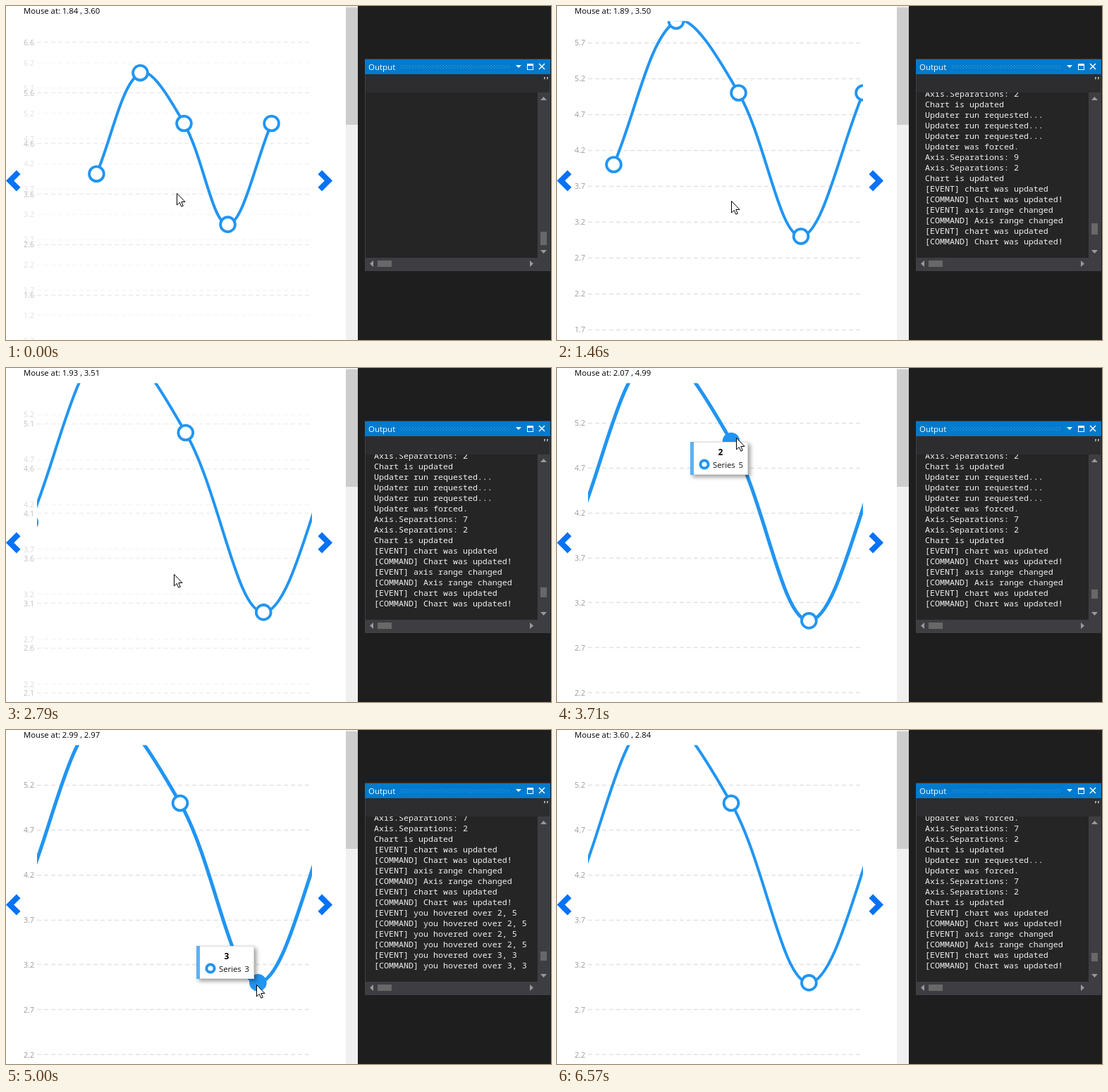
Write an HTML page with a canvas that moves like this. It is 773 px wide and 475 px high and loops after 6.63 s.

```html
<!DOCTYPE html>
<html lang="en">
<head>
<meta charset="utf-8">
<title>Zoom and pan chart</title>
<style>
html, body { margin: 0; width: 100%; height: 100%; overflow: hidden; background: #1e1e1e; }
canvas { display: block; }
</style>
</head>
<body>
<canvas id="stage" width="773" height="475"></canvas>
<script>
const g = document.getElementById('stage').getContext('2d');
const LOOP = 6630, BLUE = '#2195f2';
const SANS = '"Open Sans", sans-serif', MONO = '"Noto Sans Mono", monospace';
const VALUES = [4, 6, 5, 3, 5];

// Axis views: pixel place of index 2 / value 5, pixels per unit, top label, label step
const view = (start, x, dx, y, dy, top, step) => ({ start, x, dx, y, dy, top, step });
const VIEWS = [
  view(-999, 251.4, 57.84, 173.9, 67, 6.6, 1),
  view(-90, 255, 71.7, 151, 83, 6.2, .5),
  view(570, 257.5, 88.5, 123.5, 102, 5.7, .5),
  view(1690, 259.6, 110.5, 84.5, 127.7, 5.1, .5),
  view(2676, 247, 110.4, 104, 127.7, 5.2, .5)
];
const ANIM = 300;

// time, x, y of the pointer tip
const MOUSE = [
  [0, 243.2, 267.2], [20, 243.2, 267.2], [290, 243.4, 271.3], [1000, 243.4, 271.3],
  [1140, 247.9, 273.5], [1320, 247.9, 273.5], [1460, 247.9, 277.6], [2270, 247.9, 277.6],
  [2670, 239.4, 294.3], [3340, 239.4, 294.3], [3680, 254.7, 105.3], [3710, 254.7, 100.5],
  [3980, 254, 98], [4100, 254, 98], [4650, 352, 399], [4800, 357, 369], [4960, 356.2, 362.8],
  [5640, 356.2, 362.8], [5900, 433, 382.4], [6300, 600, 440], [6560, 720, 480]
];
const LEAVE = 5900, HOVER = { from: 3660, next: 4180, third: 4790, to: 5360 };

// Console text
const seps = (a, b) => ['Axis.Separations: ' + a, 'Axis.Separations: ' + b, 'Chart is updated'];
const note = (event, command) => ['[EVENT] ' + event, '[COMMAND] ' + command];
const drawn = note('chart was updated', 'Chart was updated!');
const tail = [...drawn, ...note('axis range changed', 'Axis range changed'), ...drawn];
const run = 'Updater run requested...', forced = 'Updater was forced.';
const update = (prev, a, b) =>
  [...seps(a, prev), run, run, run, forced, ...seps(a, b), ...tail].slice(-15);
const over = (i, v) => note(`you hovered over ${i}, ${v}`, `you hovered over ${i}, ${v}`);
const zoomed = update(2, 7, 2);
const twice = [...zoomed, ...over(2, 5), ...over(2, 5)];
// time, lines, scroll thumb top and height
const LOG = [
  [0, [], 321, 19],
  [110, update(3, 11, 3), 306, 17],
  [775, update(2, 9, 2), 309, 16],
  [1890, zoomed, 312, 14],
  [2940, zoomed, 315, 13],
  [4130, twice, 315, 13],
  [4800, [...twice, ...over(3, 3)], 315, 13],
  [6100, [forced, ...seps(7, 2), run, forced, ...seps(7, 2), ...tail], 317, 12]
];

const clamp = v => Math.max(0, Math.min(1, v));
const mix = (a, b, p) => a + (b - a) * p;
const latest = (list, t, key) => list.filter(e => e[key] <= t).pop();

function mouseAt(t) {
  const n = MOUSE.findIndex(k => k[0] > t);
  if (n < 0) return MOUSE[MOUSE.length - 1].slice(1);
  if (n === 0) return MOUSE[0].slice(1);
  const a = MOUSE[n - 1], b = MOUSE[n], p = (t - a[0]) / (b[0] - a[0]);
  return [mix(a[1], b[1], p), mix(a[2], b[2], p)];
}

function rect(color, x, y, w, h) {
  g.fillStyle = color;
  g.fillRect(x, y, w, h);
}
function text(s, x, y, font, color, align = 'left') {
  g.font = font;
  g.fillStyle = color;
  g.textAlign = align;
  g.fillText(s, x, y);
}
function poly(points, color) {
  g.beginPath();
  points.forEach(([x, y]) => g.lineTo(x, y));
  g.closePath();
  g.fillStyle = color;
  g.fill();
}
function stroke(points, color, width) {
  g.beginPath();
  points.forEach(([x, y]) => g.lineTo(x, y));
  g.strokeStyle = color;
  g.lineWidth = width;
  g.stroke();
}
function ring(x, y, r, width, fill) {
  g.beginPath();
  g.arc(x, y, r, 0, Math.PI * 2);
  g.fillStyle = fill;
  g.fill();
  g.strokeStyle = BLUE;
  g.lineWidth = width;
  g.stroke();
}

function labels(v) {
  const out = [];
  for (let n = v.top; n > 0; n -= v.step) out.push(n.toFixed(1));
  return out;
}

function grid(from, to, p, yOf) {
  const a = labels(from), b = labels(to);
  for (const s of new Set([...a, ...b])) {
    const y = yOf(+s);
    g.globalAlpha = (a.includes(s) ? 1 - p : 0) + (b.includes(s) ? p : 0);
    g.setLineDash([6, 4]);
    stroke([[44, Math.floor(y) + .5], [434, Math.floor(y) + .5]], '#e2e2e2', 1.4);
    g.setLineDash([]);
    text(s, 25, y + 4, '10.6px ' + SANS, '#9a9a9a');
  }
  g.globalAlpha = 1;
}

function spline(pts, width) {
  const smooth = .7, dist = (a, b) => Math.hypot(a[0] - b[0], a[1] - b[1]);
  const mid = (a, b, k = .5) => [mix(a[0], b[0], k), mix(a[1], b[1], k)];
  const shift = (p, m, c) => [p[0] + (c[0] - m[0]) * smooth, p[1] + (c[1] - m[1]) * smooth];
  const last = pts.length - 1;
  g.beginPath();
  g.moveTo(...pts[0]);
  for (let i = 0; i < last; i++) {
    const a = pts[Math.max(0, i - 1)], b = pts[i], c = pts[i + 1], d = pts[Math.min(last, i + 2)];
    const l1 = dist(a, b), l2 = dist(b, c), l3 = dist(c, d), center = mid(b, c);
    const m1 = mid(mid(a, b), center, l1 / (l1 + l2));
    const m2 = mid(center, mid(c, d), l2 / (l2 + l3));
    g.bezierCurveTo(...shift(b, m1, center), ...shift(c, m2, center), ...c);
  }
  g.strokeStyle = BLUE;
  g.lineWidth = width;
  g.stroke();
}

function chart(t) {
  const n = VIEWS.indexOf(latest(VIEWS, t, 'start'));
  const from = VIEWS[n - 1], to = VIEWS[n], p = clamp((t - to.start) / ANIM);
  const at = key => mix(from[key], to[key], p);
  const yOf = v => at('y') + (5 - v) * at('dy');
  grid(from, to, p, yOf);

  const hovering = t >= HOVER.from && t < HOVER.to;
  const active = !hovering ? -1 : t < HOVER.next ? 2 : t >= HOVER.third ? 3 : -1;
  const pts = VALUES.map((v, i) => [at('x') + (i - 2) * at('dx'), yOf(v)]);
  g.save();
  g.beginPath();
  g.rect(44, 21.5, 390, 460);
  g.clip();
  spline(pts, hovering ? 5 : 4);
  pts.forEach(([x, y], i) => ring(x, y, 10.4, 3.8, i === active ? BLUE : '#fff'));
  g.restore();
  if (hovering) tooltip(t);
}

function tooltip(t) {
  const p = clamp((t - HOVER.third) / 160);
  const x = Math.round(mix(189, 270, p)), y = Math.round(mix(105, 307, p));
  const third = t >= HOVER.third;
  g.save();
  g.shadowColor = 'rgba(0,0,0,.4)';
  g.shadowBlur = 6;
  g.shadowOffsetX = g.shadowOffsetY = 3;
  rect('#fff', x, y, 82, 47);
  g.restore();
  g.strokeStyle = '#dcdcdc';
  g.lineWidth = 1;
  g.strokeRect(x + .5, y + .5, 81, 46);
  rect('#5eb1f3', x, y, 5, 47);
  text(third ? '3' : '2', x + 43, y + 19, 'bold 12px ' + SANS, '#000', 'center');
  ring(x + 20, y + 32, 5.6, 4, '#fff');
  text('Series', x + 32, y + 37, '11.3px ' + SANS, '#111');
  text(third ? '3' : '5', x + 68.5, y + 37, '11.3px ' + SANS, '#111');
}

function readout(t) {
  const s = Math.min(t, LEAVE), [x, y] = mouseAt(s - 30), v = latest(VIEWS, s, 'start');
  const a = 2 + (x - v.x) / v.dx, b = 5 - (y - v.y) / v.dy;
  text(`Mouse at: ${a.toFixed(2)} , ${b.toFixed(2)}`, 25, 11, '11.3px ' + SANS, '#000');
}

function panel(t) {
  const [, lines, top, height] = latest(LOG, t, 0);
  rect('#1e1e1e', 499, 0, 274, 475);
  rect('#3f3f46', 509, 75, 263, 302);
  rect('#007acc', 509, 76, 263, 21);
  rect('#2d2d30', 510, 97, 261, 26);
  rect('#252526', 510, 123, 244, 235);
  rect('#3e3e42', 754, 123, 17, 253);
  rect('#3e3e42', 510, 358, 244, 18);
  text('Output', 514, 91, '11.5px ' + SANS, '#fff');
  for (let x = 560; x < 716; x += 4) {
    for (const [dx, y] of [[0, 84], [2, 86], [0, 88]]) rect('#4ba3dd', x + dx, y, 1, 1);
  }

  poly([[723, 84], [731, 84], [727, 88]], '#fff');
  g.strokeStyle = '#fff';
  g.lineWidth = 1;
  g.strokeRect(739.5, 82.5, 8, 8);
  rect('#fff', 739, 82, 9, 3);
  stroke([[756, 82], [764, 90]], '#fff', 1.5);
  stroke([[764, 82], [756, 90]], '#fff', 1.5);
  for (const x of [763, 767]) poly([[x, 101], [x + 2, 101], [x + 2, 103], [x, 105]], '#aaa');

  poly([[758, 134], [767, 134], [762.5, 129]], '#999');
  poly([[758, 347], [767, 347], [762.5, 352]], '#999');
  poly([[521, 362], [521, 371], [516, 366.5]], '#999');
  poly([[743, 362], [743, 371], [748, 366.5]], '#999');
  rect('#686868', 758, top, 9, height);
  rect('#686868', 527, 362, 20, 9);

  g.save();
  g.beginPath();
  g.rect(510, 123, 244, 235);
  g.clip();
  lines.slice(-15).forEach((s, i) => text(s, 522, 129 + i * 15, '11.67px ' + MONO, '#f0f0f0'));
  g.restore();
}

function pointer(t) {
  const [x, y] = mouseAt(t).map(Math.round);
  g.save();
  g.translate(x - .5, y - .5);
  poly([[0, 0], [0, 16.5], [3.8, 13], [6.3, 18.8], [8.8, 17.7], [6.3, 12], [11.5, 12]], '#fff');
  g.strokeStyle = '#000';
  g.lineWidth = 1;
  g.stroke();
  g.restore();
}

function draw(t) {
  rect('#fff', 0, 0, 499, 475);
  chart(t);
  readout(t);
  stroke([[17.7, 236.4], [5.6, 248.5], [17.7, 260.6]], '#0672f5', 8);
  stroke([[445.3, 236.4], [457.4, 248.5], [445.3, 260.6]], '#0672f5', 8);
  rect('#f0f0f0', 482, 0, 17, 475);
  rect('#cdcdcd', 482, 2, 17, 167);
  panel(t);
  pointer(t);
}

const begin = performance.now();
function tick() {
  draw((performance.now() - begin) % LOOP);
  requestAnimationFrame(tick);
}
tick();
</script>
</body>
</html>
```
